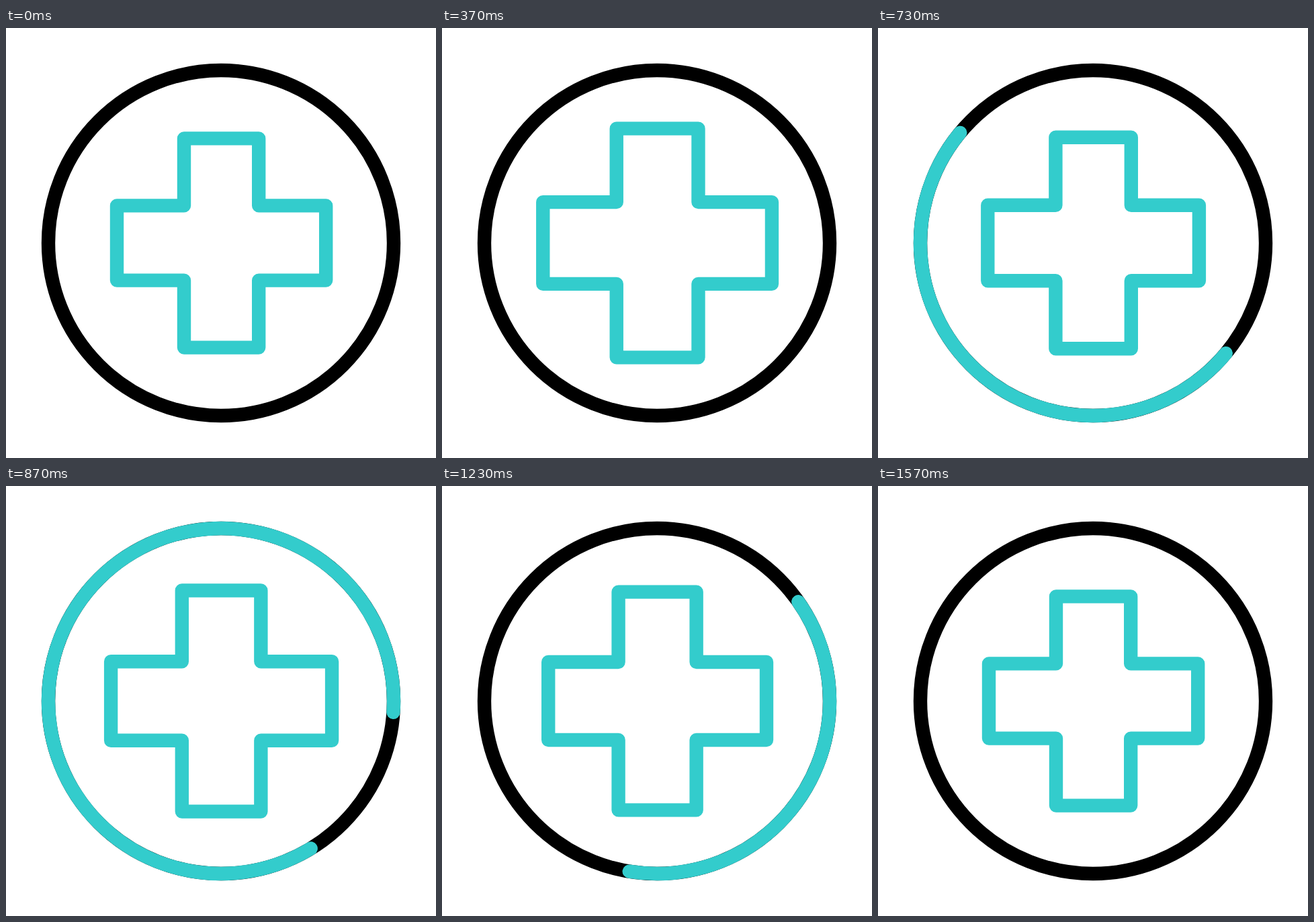
An HTML page that plays this animation: 640 px wide and 640 px high, repeating every 1.67 s.

```html
<!DOCTYPE html>
<html>
<head>
<meta charset="utf-8">
<style>
  html, body { margin: 0; width: 100%; height: 100%; overflow: hidden; background: #fff; }
  svg { display: block; width: 100%; height: 100%; fill: none; stroke-width: 20.4; stroke-linecap: round; stroke-linejoin: round; }
</style>
</head>
<body>
<svg viewBox="0 0 640 640">
  <circle cx="320" cy="320" r="257" stroke="#000"/>
  <circle id="arc" cx="320" cy="320" r="257" pathLength="360" stroke="#3cc"/>
  <path id="cross" stroke="#3cc"/>
</svg>
<script>
const LOOP = 1670, LAST = 47;
const arc = document.getElementById('arc');
const cross = document.getElementById('cross');

const progress = (x, from, to) => Math.min(1, Math.max(0, (x - from) / (to - from)));
const smooth = x => x * x * (3 - 2 * x);
const ramp = x => x * x + 2 * x ** 3;
const easeInOut = x => x < 0.5 ? ramp(x) : 1 - ramp(1 - x);

function drawCross(step) {
  const move = (from, to) => smooth(progress(step, from, to));
  const pulse = move(0, 9.6) - move(9.6, 19.6) + move(19.6, 31.3) - move(31.3, 41.8);
  const scale = 1 + 0.1 * pulse;
  const arm = 55.6 * scale, reach = 155.6 * scale, side = reach - arm;
  cross.setAttribute('d', `M${320.6 - arm} ${320 - reach}h${2 * arm}v${side}h${side}v${2 * arm}h${-side}v${side}` +
    `h${-2 * arm}v${-side}h${-side}v${-2 * arm}h${side}z`);
}

function drawArc(step) {
  const head = 360 * easeInOut(progress(step, 12, 32));
  const tail = 360 * easeInOut(progress(step, 24, 47.4));
  const spin = 3.97 * (step - 12);
  arc.style.display = step > 12 && step < LAST ? '' : 'none';
  arc.setAttribute('stroke-dasharray', `${head - tail} 360`);
  arc.setAttribute('transform', `rotate(${spin + tail} 320 320)`);
}

function render() {
  // 30 steps per second, then a short hold on the last one
  const step = Math.min(LAST, Math.floor((performance.now() % LOOP) * 0.03 + 0.15));
  drawCross(step);
  drawArc(step);
  requestAnimationFrame(render);
}
render();
</script>
</body>
</html>
```
